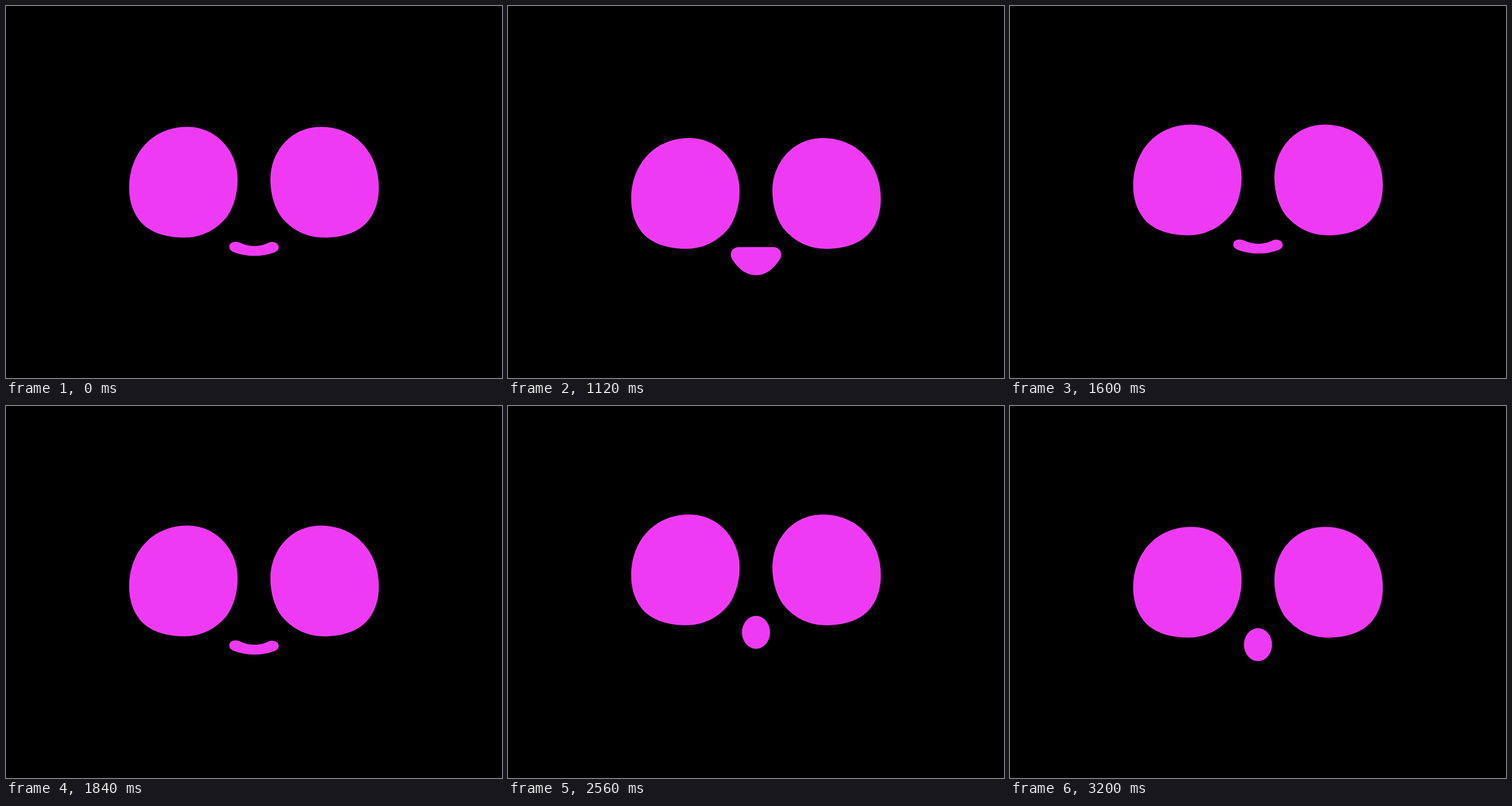
Animation, 864 px wide and 648 px high, one loop 3.28 s. Source, as an HTML page:

```html
<!DOCTYPE html>
<html>
<head>
<meta charset="utf-8">
<style>
  html, body { margin: 0; height: 100%; overflow: hidden; background: #000; }
  svg { display: block; width: 864px; height: 648px; fill: #ee3bf3; }
</style>
</head>
<body>
<svg viewBox="0 0 864 648">
  <g id="face">
    <path id="eye" d="M316 210.5C366 210.5 403.5 252 403.5 303C403.5 326 397 350 385 367C366 390 341 403.5 310 403.5C278 403.5 248 394 232 373C219 356 214.5 336 214.5 316C214.5 258 254 210.5 316 210.5Z"/>
    <use href="#eye" transform="matrix(-1 0 0 1 864 0)"/>
    <path id="smile" d="M408 412.5C424 420 442 420 457 412.5C466 408.5 475 413 475 420C475 425 472 427 468 429C446 437.5 419 437.5 396 428.5C391 426 389 423 389 419.5C389 411 399 408.5 408 412.5Z"/>
    <path id="open" d="M402 400.5H462C473 400.5 479.5 411 474 421C463 438 449 449.5 432 449.5C415 449.5 401 438 390 421C384.5 411 391 400.5 402 400.5Z"/>
    <ellipse id="round" cx="432" cy="415.75" rx="24.5" ry="28.75"/>
  </g>
</svg>
<script>
const LOOP = 3280, STEP = 80;
const $ = id => document.getElementById(id);
const mouths = ['smile', 'open', 'round'];

// [time, vertical offset, power of the ease-out into this key]
const keys = [
  [800, 0], [1050, 19.5], [1220, 19.5], [1640, -4.5], [2050, 0],
  [2214, 0], [2428, -21.5], [2640, -21.5], [3185, 0, 2]
];

function offset(t) {
  const i = keys.findIndex(k => k[0] > t);
  if (i < 1) return 0;
  const [t0, y0] = keys[i - 1], [t1, y1, power = 1] = keys[i];
  const s = 1 - (1 - (t - t0) / (t1 - t0)) ** power;
  return y0 + (y1 - y0) * (1 - Math.cos(Math.PI * s)) / 2;
}

function mouthAt(t) {
  if (t >= 2240) return 'round';
  return t >= 960 && t < 1600 ? 'open' : 'smile';
}

function draw(now) {
  const t = Math.floor(now % LOOP / STEP) * STEP;
  const current = mouthAt(t);
  $('face').setAttribute('transform', `translate(0 ${offset(t).toFixed(2)})`);
  for (const id of mouths) $(id).style.display = id === current ? '' : 'none';
}

const start = performance.now();
function tick() {
  draw(performance.now() - start);
  requestAnimationFrame(tick);
}
tick();
</script>
</body>
</html>
```
